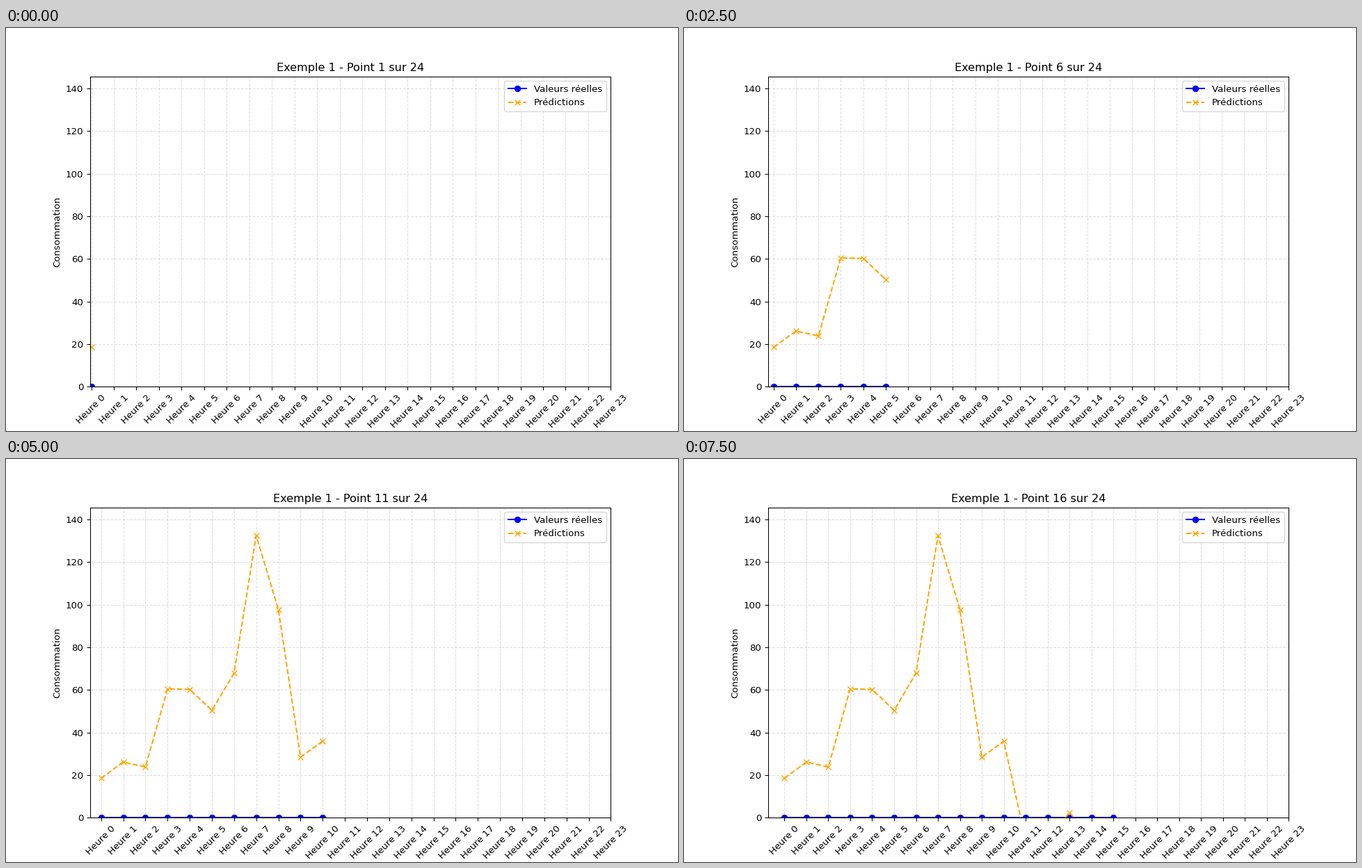
Write a matplotlib script that moves like this. It is 966 by 580 pixels and loops after 8000 ms.

```python
import matplotlib.pyplot as plt
import numpy as np
from matplotlib.animation import FuncAnimation

HOURS = 24
STEPS = 16
INTERVAL = 500
WIDTH, HEIGHT, DPI = 966, 580, 96.6

# Daytime turning points, then a night level below zero with one bump at 13 h
DAY = [18.5, 26.1, 23.8, 60.5, 60.2, 50.4, 67.8, 132.4, 97.7, 28.4, 35.9]
night = np.arange(len(DAY), STEPS)
predictions = np.append(DAY, 2.5 - 13 * np.minimum(abs(night - 13), 1))
actual = np.zeros(STEPS)

fig, ax = plt.subplots(figsize=(WIDTH / DPI, HEIGHT / DPI), dpi=DPI)
real_line, = ax.plot([], [], color="blue", marker="o", label="Valeurs réelles")
pred_line, = ax.plot([], [], color="orange", marker="x", linestyle="--",
                     label="Prédictions")
title = ax.set_title("")
ax.set_ylabel("Consommation")
ax.set_xticks(range(HOURS), [f"Heure {h}" for h in range(HOURS)], rotation=45)
ax.set_ylim(0, 1.1 * predictions.max())
ax.grid(True, linestyle="--", alpha=0.4)
ax.legend(loc="upper right")


def update(step):
    count = step + 1
    hours = np.arange(count)
    real_line.set_data(hours, actual[:count])
    pred_line.set_data(hours, predictions[:count])
    # 5 % margin on the plotted span; a lone point gets a small default one
    margin = 0.05 * step if step else 0.055
    ax.set_xlim(-margin, HOURS - 1)
    title.set_text(f"Exemple 1 - Point {count} sur {HOURS}")
    return real_line, pred_line, title


anim = FuncAnimation(fig, update, frames=STEPS, interval=INTERVAL,
                     repeat=True, repeat_delay=0, blit=False)
plt.show()
```
